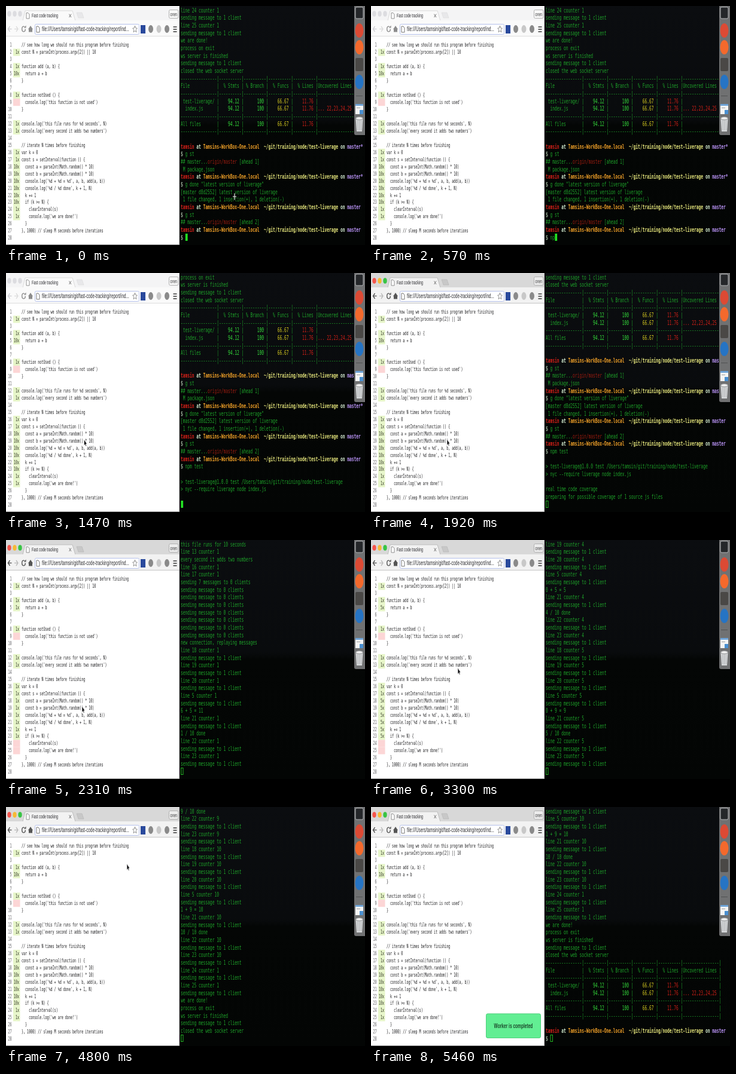
Recreate the animation shown at these times as an HTML page with a canvas. Size 600 by 400 pixels, loop 5490 ms.

```html
<!DOCTYPE html>
<html lang="en">
<head>
<meta charset="utf-8">
<title>Coverage demo</title>
<style>
  html, body { margin: 0; width: 600px; height: 400px; overflow: hidden; background: #040605; }
  canvas { display: block; }
</style>
</head>
<body>
<canvas id="stage" width="600" height="400"></canvas>
<script>
const ctx = document.getElementById('stage').getContext('2d');
const LOOP = 5490;
const MONO = '"DejaVu Sans Mono", monospace';
const SANS = '"Liberation Sans", Arial, sans-serif';
const GREEN = '#1ea32a', BRIGHT = '#35e03c', YELLOW = '#d8cc20', RED = '#d42018';
const ORANGE = '#f0a028', PALE = '#d4ecd0', VIOLET = '#b892f4';
const USER = 'tamsin';

// ---------- drawing helpers ----------
function rect(x, y, w, h, color) {
  ctx.fillStyle = color;
  ctx.fillRect(x, y, w, h);
}
function shape(points, fill, stroke, width = 1) {
  ctx.beginPath();
  points.forEach(([x, y], i) => i ? ctx.lineTo(x, y) : ctx.moveTo(x, y));
  if (fill) { ctx.closePath(); ctx.fillStyle = fill; ctx.fill(); }
  if (stroke) { ctx.strokeStyle = stroke; ctx.lineWidth = width; ctx.stroke(); }
}
function oval(x, y, rx, ry, fill, stroke) {
  ctx.beginPath();
  ctx.ellipse(x, y, rx, ry, 0, 0, Math.PI * 2);
  if (fill) { ctx.fillStyle = fill; ctx.fill(); }
  if (stroke) { ctx.strokeStyle = stroke; ctx.lineWidth = 1; ctx.stroke(); }
}
function round(x, y, w, h, r, fill, stroke) {
  ctx.beginPath();
  ctx.roundRect(x, y, w, h, r);
  ctx.fillStyle = fill;
  ctx.fill();
  if (stroke) { ctx.strokeStyle = stroke; ctx.lineWidth = 1; ctx.stroke(); }
}
// The whole screen is squeezed sideways; returns the drawn width.
function text(str, x, y, font, color, align = 'left', squeeze = 0.6) {
  ctx.save();
  ctx.translate(x, y);
  ctx.scale(squeeze, 1);
  ctx.font = font;
  ctx.textAlign = align;
  ctx.textBaseline = 'middle';
  ctx.fillStyle = color;
  ctx.fillText(str, 0, 0);
  const w = ctx.measureText(str).width * squeeze;
  ctx.restore();
  return w;
}

// ---------- terminal log ----------
const plain = s => [[s, GREEN]];
const prompt = mark => [
  [USER, RED, 1], [' at ', PALE, 1], ['Tamsins-WorkBox-One.local', ORANGE, 1],
  ['  ~/git/training/node/test-liverage', '#e6e67c', 1], [' on ', PALE, 1], ['master' + mark, VIOLET, 1]
];
const command = s => [['$ ', PALE], [s, GREEN]];
const status = n => [['## master...', GREEN], ['origin/master', '#9c1c10'], [` [ahead ${n}]`, GREEN]];
const sent = 'sending message to 1 client';
const hit = (line, n) => [`line ${line} counter ${n}`, sent];

const rule = plain('-'.repeat(16) + '|' + ('-'.repeat(10) + '|').repeat(4) + '-'.repeat(16) + '|');
const bar = ['|', GREEN];
const tableRow = (name, missing) => [
  [name.padEnd(16), GREEN], bar, ['    94.12 ', BRIGHT], bar, ['      100 ', BRIGHT], bar,
  ['    66.67 ', YELLOW], bar, ['    11.76 ', RED], bar, [missing.padEnd(16), RED], bar
];
const table = [
  rule,
  plain('File            |  % Stmts | % Branch |  % Funcs |  % Lines |Uncovered Lines |'),
  rule,
  tableRow(' test-liverage/', ''),
  tableRow('  index.js', '... 22,23,24,25'),
  rule,
  tableRow('All files', ''),
  rule,
  plain('')
];
const ending = [
  ...hit(24, 1), ...hit(25, 1), 'we are done!', 'process on exit',
  'ws server is finished', sent, 'closed the web socket server'
].map(plain);

const log = [];
const print = (at, rows) => rows.forEach(r => log.push({ at, row: typeof r === 'string' ? plain(r) : r }));

const ENTER = 930, FOCUS = 1530, CONNECT = 2080, FIRST = 2190, STEP = 246;
const TABLE = 5010, TOAST = 5190;
const finishAt = n => FIRST + (n - 1) * STEP;

print(0, [
  ...ending, ...table,
  prompt('*'), command('g st'), status(1), ' M package.json',
  prompt('*'), command('g done "latest version of liverage"'),
  '[master d8d2552] latest version of liverage',
  ' 1 file changed, 1 insertion(+), 1 deletion(-)',
  prompt(''), command('g st'), status(2), prompt('')
]);
print(ENTER, [command('npm test')]);
print(1230, ['', `> test-liverage@1.0.0 test /Users/${USER}/git/training/node/test-liverage`,
  '> nyc --require liverage node index.js', '']);
print(1620, ['real time code coverage']);
print(1710, ['preparing for possible coverage of 1 source js files']);
print(1980, ['line 4 counter 1', 'line 8 counter 1', 'line 2 counter 1', 'line 12 counter 1',
  'this file runs for 10 seconds', 'line 13 counter 1', 'every second it adds two numbers',
  'line 16 counter 1', 'line 17 counter 1', 'sending 7 messages to 0 clients',
  ...Array(7).fill('sending message to 0 clients')]);
print(CONNECT, ['new connection, replaying messages']);
['65', '37', '24', '05', '09', '72', '48', '16', '83', '19'].forEach((pair, i) => {
  const n = i + 1, [a, b] = [...pair].map(Number);
  print(finishAt(n), [
    ...hit(18, n), ...hit(19, n), ...hit(20, n), ...hit(5, n), `${a} + ${b} = ${a + b}`,
    ...hit(21, n), `${n} / 10 done`, ...hit(22, n), ...hit(23, n)
  ]);
});
print(finishAt(10) + 30, ending);
print(TABLE, [...table, prompt('')]);

function drawRow(row, y) {
  let x = 292;
  for (const [str, color, bold] of row) {
    x += text(str, x, y, `${bold ? 'bold ' : ''}10.42px ${MONO}`, color);
  }
  return x;
}

function drawTerminal(t) {
  const bg = ctx.createLinearGradient(0, 0, 0, 400);
  bg.addColorStop(0, '#0b0d10');
  bg.addColorStop(0.47, '#090b0d');
  bg.addColorStop(0.5, '#040605');
  bg.addColorStop(1, '#030504');
  rect(290, 0, 310, 400, bg);

  const rows = log.filter(l => l.at <= t).slice(-30);
  rows.forEach((l, i) => drawRow(l.row, 7.8 + i * 12.67));

  let input = plain('');
  if (t < ENTER) {
    const typed = Math.max(0, Math.min(8, Math.floor((t - 420) / 55)));
    input = command('npm test'.slice(0, typed));
  } else if (t >= TABLE) {
    input = command('');
  }
  const x = drawRow(input, 387.8);
  if (t < FOCUS) {
    rect(x + 0.3, 381, 3.8, 12, '#22e022');
  } else {
    ctx.strokeStyle = '#22b022';
    ctx.lineWidth = 1;
    ctx.strokeRect(x + 0.5, 381.5, 3.5, 11);
  }
}

// ---------- dock ----------
function drawDock() {
  round(582, -6, 24, 222, 3, '#707172');
  round(584, 2, 13, 19, 2, '#25272a', '#b4b6b8');
  oval(590.5, 41, 7, 12, '#dc4a34');
  oval(590.5, 69, 7, 12, '#f4692c');
  round(584, 87, 13, 22, 2, '#4a4846');
  oval(590.5, 127, 7, 12, '#2674c4');
  rect(585, 150, 11, 1, '#505152');
  rect(584, 164, 13, 17, '#f4f4f4');
  rect(584, 164, 13, 3, '#6fa4d8');
  rect(591, 174, 6, 7, '#4a8fd0');
  rect(586, 170, 6, 1, '#a0a0a0');
  shape([[584.5, 188], [596.5, 188], [595, 210], [586, 210]], '#d6d8da');
  for (let i = 0; i < 3; i++) rect(587.5 + i * 2.7, 191, 0.8, 17, '#a6a8aa');
  oval(590.5, 188, 6, 2.4, '#f0f0f0', '#8c8e90');
}

// ---------- browser ----------
const code = `// see how long we should run this program before finishing
const N = parseInt(process.argv[2]) || 10

function add (a, b) {
  return a + b
}

function notUsed () {
  console.log('this function is not used')
}

console.log('this file runs for %d seconds', N)
console.log('every second it adds two numbers')

// iterate N times before finishing
var k = 0
const s = setInterval(function () {
  const a = parseInt(Math.random() * 10)
  const b = parseInt(Math.random() * 10)
  console.log('%d + %d = %d', a, b, add(a, b))
  console.log('%d / %d done', k + 1, N)
  k += 1
  if (k >= N) {
    clearInterval(s)
    console.log('we are done!')
  }
}, 1000) // sleep M seconds before iterations
`.split('\n');
const once = [2, 4, 8, 12, 13, 16, 17];
const last = [24, 25];
const looped = n => n === 5 || (n >= 18 && n <= 23);

// Hit count of a line, or undefined where nothing is counted.
function count(line, t) {
  const done = t < CONNECT ? 10 : Math.max(0, Math.min(10, Math.floor((t - FIRST) / STEP) + 1));
  if (once.includes(line)) return 1;
  if (line === 9) return 0;
  if (last.includes(line)) return done === 10 ? 1 : 0;
  if (looped(line)) return done;
}

function drawToolbar(active) {
  const ink = active ? '#555' : '#8c8c8c', faint = active ? '#bbb' : '#dcdcdc';
  const back = active ? ink : '#cfcfd4';
  rect(0, 24, 290, 27, active ? '#f2f2f2' : '#fafafa');
  rect(0, 50, 290, 1, active ? '#c4c4c4' : '#dcdcdc');
  shape([[6.5, 34], [3.5, 38.5], [6.5, 43]], null, back, 1.4);
  shape([[3.5, 38.5], [9.5, 38.5]], null, back, 1.4);
  shape([[17, 34], [20, 38.5], [17, 43]], null, faint, 1.4);
  shape([[14, 38.5], [20, 38.5]], null, faint, 1.4);
  ctx.beginPath();
  ctx.ellipse(29.5, 38.5, 2.8, 4.4, 0, 0, 5.2);
  ctx.strokeStyle = ink;
  ctx.lineWidth = 1.4;
  ctx.stroke();
  shape([[29.8, 36.5], [33.5, 36.5], [33.5, 32.5]], ink);
  shape([[37, 39], [41, 33], [45, 39], [44, 39], [44, 43.5], [38, 43.5], [38, 39]], ink);
  round(48.5, 30.5, 174, 17, 2, '#fff', '#b4c0ea');
  shape([[51, 34], [54, 34], [56, 37], [56, 44], [51, 44]], '#fff', '#777');
  text(`file:///Users/${USER}/git/fast-code-tracking/report/ind...`, 60, 39, `10.5px ${SANS}`, '#2c2c30');
  const star = Array.from({ length: 11 }, (_, i) => {
    const a = -Math.PI / 2 + i * Math.PI / 5, r = i % 2 ? 0.45 : 1;
    return [215.5 + Math.cos(a) * 4 * r, 39 + Math.sin(a) * 6 * r];
  });
  shape(star, null, '#777', 0.8);
  rect(225, 32, 8, 14, '#2a4a9c');
  oval(242, 38.5, 4, 6.5, '#8a8a8a');
  oval(255.5, 38.5, 4, 6.5, '#c8c8c8');
  oval(269, 38.5, 4, 6.5, '#8a8a8a');
  for (let i = 0; i < 3; i++) rect(279.5, 34 + i * 4, 6, 2, '#666');
}

function drawBrowser(t) {
  const active = t >= FOCUS;
  rect(0, 0, 290, 400, '#fff');
  rect(0, 0, 290, 24, active ? '#d8d8d8' : '#f4f4f5');
  (active ? ['#f4554c', '#f6b934', '#38c444'] : ['#dcdce0', '#dcdce0', '#dcdce0'])
    .forEach((c, i) => oval(5.5 + i * 9, 13, 3.2, 4.8, c));

  shape([[28, 24.5], [32, 8], [111, 8], [116, 24.5]], active ? '#f2f2f2' : '#fafafa', active ? '#b4b4b4' : '#d4d4d4', 0.8);
  shape([[34, 11.5], [37, 11.5], [39, 14], [39, 21], [34, 21]], '#fff', '#777', 0.8);
  text('Fast code tracking', 43, 16.5, `9px ${SANS}`, '#2c2c30');
  shape([[105.5, 13.5], [109, 19]], null, '#777');
  shape([[109, 13.5], [105.5, 19]], null, '#777');
  shape([[118, 11], [127, 11], [130, 20], [121, 20]], active ? '#c8c8c8' : '#e8e8ea', active ? '#b4b4b4' : '#dadada', 0.6);
  round(272.5, 6.5, 15.5, 14, 2, active ? '#ececec' : '#f8f8f8', '#b0b0b0');
  text('oren', 280.3, 14, `9.5px ${SANS}`, '#3a3a3c', 'center');
  drawToolbar(active);

  code.forEach((str, i) => {
    const line = i + 1, y = 66 + i * 11.96, n = count(line, t);
    text(String(line), 9.5, y, `9px ${MONO}`, '#5c5c60', 'right', 0.56);
    if (n !== undefined) rect(12, y - 6.5, 11.5, 12, n ? '#e6f5c8' : '#fcd6d6');
    if (n) text(n + 'x', 22, y, `9px ${MONO}`, '#2c3020', 'right', 0.56);
    text(str, 26, y, `9px ${MONO}`, '#1c1c1e', 'left', 0.56);
  });
  rect(0, 399, 290, 1, '#8a8a8a');
  rect(289.5, 0, 0.5, 400, '#9a9a9a');

  if (t >= TOAST) {
    round(192.5, 346, 91, 40.5, 2.5, '#62ee93', '#4fcf7c');
    text('Worker is completed', 238, 366.5, `bold 11px ${SANS}`, '#1c4a2c', 'center');
  }
}

// ---------- pointer ----------
const path = [
  [1080, 382, 319], [1500, 127, 283], [2400, 127, 283], [3200, 145, 219],
  [3500, 145, 219], [4500, 202, 100], [4860, 202, 100], [5250, 215, -20]
];
function drawPointer(t) {
  if (t < 400) return drawCross(382, 319);
  const i = path.findIndex(p => p[0] > t);
  if (i < 1) return;
  const [t0, x0, y0] = path[i - 1], [t1, x1, y1] = path[i];
  const k = (t - t0) / (t1 - t0), e = k * k * (3 - 2 * k);
  const x = x0 + (x1 - x0) * e, y = y0 + (y1 - y0) * e;
  if (x > 290) return drawCross(x, y);
  const arrow = [[0, -5], [0, 5.5], [1.6, 3.4], [2.8, 6.4], [4, 5.6], [2.9, 2.8], [4.8, 2.6]];
  shape(arrow.map(([dx, dy]) => [x + dx, y + dy]), '#121214', '#f6f6f6', 0.6);
}
function drawCross(x, y) {
  rect(x - 3.5, y - 1.5, 7, 3, '#101210');
  rect(x - 1.5, y - 6, 3, 12, '#101210');
  rect(x - 3, y - 0.6, 6, 1.2, '#d8e0d8');
  rect(x - 0.6, y - 5.5, 1.2, 11, '#d8e0d8');
}

const start = performance.now();
function frame() {
  const t = (performance.now() - start) % LOOP;
  drawTerminal(t);
  drawDock();
  drawBrowser(t);
  drawPointer(t);
  requestAnimationFrame(frame);
}
frame();
</script>
</body>
</html>
```
